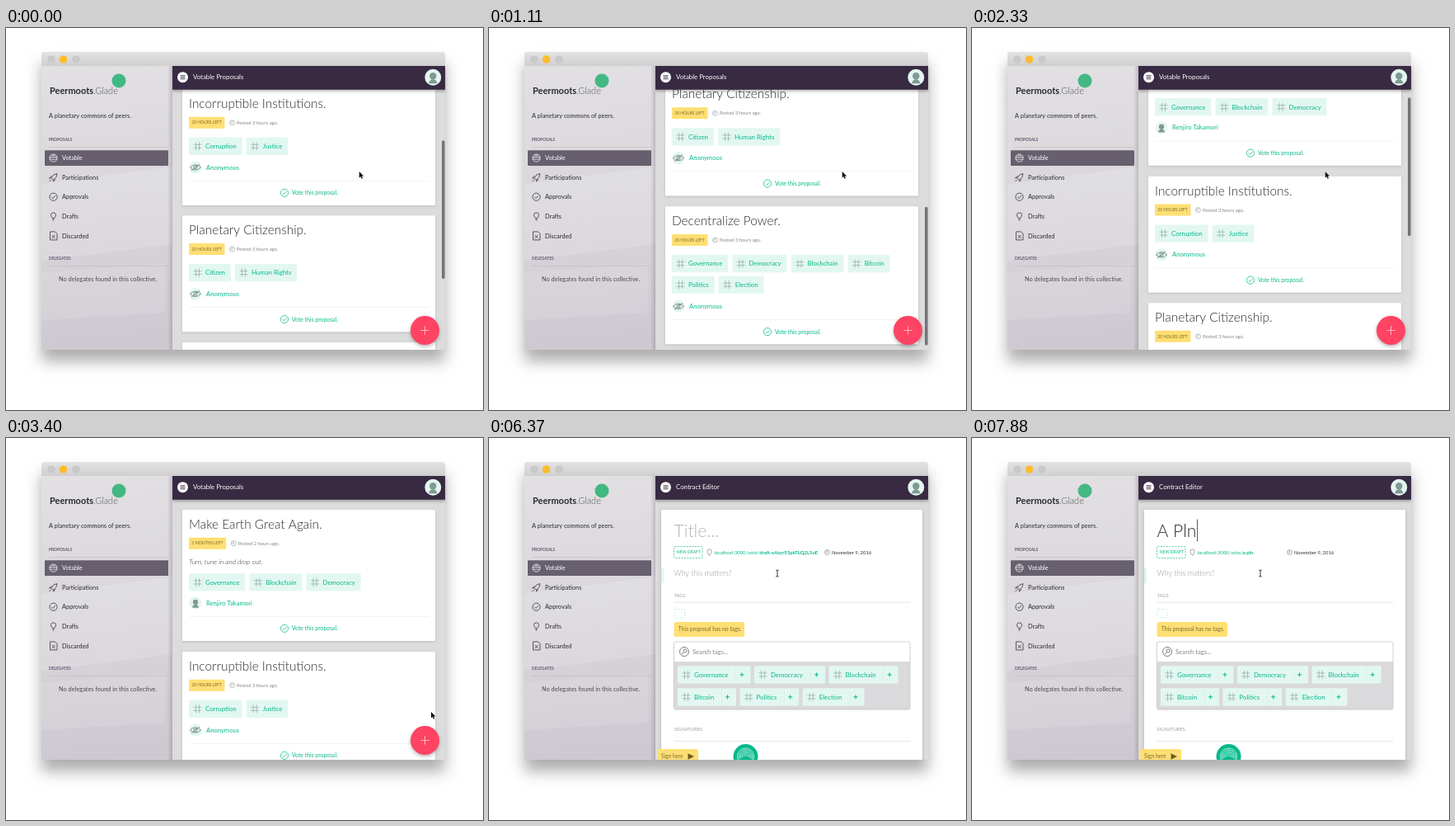
Recreate the animation shown at these times as an HTML page with a canvas. Size 579 px wide and 463 px high, loop 8000 ms.

```html
<!DOCTYPE html>
<html lang="en">
<head>
<meta charset="utf-8">
<title>Votable Proposals</title>
<style>
  html, body { margin: 0; width: 100%; height: 100%; overflow: hidden; background: #fff; }
  canvas { display: block; width: 579px; height: 463px; }
</style>
</head>
<body>
<canvas id="stage"></canvas>
<script>
const W = 579, H = 463, LOOP = 8000;
const canvas = document.getElementById('stage');
const c = canvas.getContext('2d');
const ratio = window.devicePixelRatio || 1;
canvas.width = W * ratio;
canvas.height = H * ratio;

const GREEN = '#02b989', MINT = '#e3f7f1', YELLOW = '#ffdf73', INK = '#2b2a30', PURPLE = '#372a42';

const clamp = v => Math.max(0, Math.min(1, v));
const span = (t, a, b) => clamp((t - a) / (b - a));
const smooth = p => p * p * (3 - 2 * p);
const mix = (a, b, p) => a + (b - a) * p;

// Text is placed by its left edge and the middle of its capitals.
function text(s, x, y, size, color = INK, style = '400') {
  c.font = `${style} ${size}px Lato, sans-serif`;
  c.fillStyle = color;
  c.fillText(s, x, y + size * 0.36);
  return c.measureText(s).width;
}

function box(x, y, w, h, fill, r = 0) {
  c.beginPath();
  c.roundRect(x, y, w, h, r);
  c.fillStyle = fill;
  c.fill();
}

function frame(x, y, w, h, color, r = 1, dash = []) {
  c.setLineDash(dash);
  c.lineWidth = 0.7;
  c.strokeStyle = color;
  c.beginPath();
  c.roundRect(x, y, w, h, r);
  c.stroke();
  c.setLineDash([]);
}

function disc(x, y, r, fill) {
  c.beginPath();
  c.arc(x, y, r, 0, 7);
  c.fillStyle = fill;
  c.fill();
}

function stroke(d, x, y, color, width = 0.75) {
  c.save();
  c.translate(x, y);
  c.strokeStyle = color;
  c.lineWidth = width;
  c.stroke(new Path2D(d));
  c.restore();
}

function shadowed(blur, dy, alpha, draw) {
  c.save();
  c.shadowColor = `rgba(0,0,0,${alpha})`;
  c.shadowBlur = blur * ratio;
  c.shadowOffsetY = dy * ratio;
  draw();
  c.restore();
}

function clipped(x, y, w, h, draw) {
  c.save();
  c.beginPath();
  c.rect(x, y, w, h);
  c.clip();
  draw();
  c.restore();
}

function ramp(x0, y0, x1, y1, ...colors) {
  const g = c.createLinearGradient(x0, y0, x1, y1);
  colors.forEach((color, i) => g.addColorStop(i / (colors.length - 1), color));
  return g;
}

const ring = r => `M${r} 0A${r} ${r} 0 1 1 ${-r} 0A${r} ${r} 0 1 1 ${r} 0`;
const ICON = {
  hash: 'M-2 -5V5M2 -5V5M-5 -2H5M-5 2H5',
  check: ring(4.6) + 'M-2.2 0L-0.5 1.8L2.4 -1.6',
  clock: ring(2.9) + 'M0 -1.8V0H-1.6',
  eye: 'M-6.5 0Q0 -6.5 6.5 0Q0 6.5 -6.5 0M-5 4L5 -4' + ring(2),
  ballot: ring(4.6) + 'M-4.6 -1H4.6M-4.6 1.5H4.6M-2 -3H2',
  rocket: 'M4.5 -4.5Q0 -4.5 -2.5 0.5L0 3Q4.5 0 4.5 -4.5M-2.5 0.5L-5 1L-2 -2M0 3L0 5L2.5 2M-2.5 2.5L-5 5',
  bulb: 'M-1.3 2Q-3 0 -3 -1.5A3 3 0 1 1 3 -1.5Q3 0 1.3 2ZM-1.2 3.5H1.2M-0.7 4.8H0.7',
  paper: 'M-4 -5H2L4.5 -2.5V5H-4ZM-1.8 -1L2 3M2 -1L-1.8 3',
  pin: 'M0 4Q-2.6 1 -2.6 -1A2.6 2.6 0 1 1 2.6 -1Q2.6 1 0 4',
  lens: ring(5.5) + 'M3 -1A2 2 0 1 1 -1 -1A2 2 0 1 1 3 -1M-0.5 0.5L-3 3'
};

function portrait(x, y, r) {
  disc(x, y, r, '#e5f5f0');
  disc(x, y - r * 0.15, r * 0.42, '#7f9993');
  c.beginPath();
  c.arc(x, y + r * 0.75, r * 0.5, Math.PI, 0);
  c.fill();
}

function tag(name, x, y, addable) {
  c.font = '400 7.85px Lato, sans-serif';
  const inner = c.measureText(name).width;
  const w = inner + (addable ? 47 : 27);
  box(x, y, w, 21.3, MINT, 1);
  stroke(ICON.hash, x + 10.5, y + 10.7, '#6f8c86', 0.5);
  text(name, x + 20, y + 10.7, 7.85, GREEN);
  if (addable) {
    box(x + inner + 29, y, 0.5, 21.3, '#d2ece4');
    stroke('M-2.5 0H2.5M0 -2.5V2.5', x + w - 10.5, y + 10.7, GREEN, 1);
  }
  return w;
}

function drawShell() {
  shadowed(18, 14, 0.32, () => box(43, 29, 490, 361, '#ddd', [4, 4, 0, 0]));
  box(43, 29, 490, 17, ramp(0, 29, 0, 46, '#e4e3e4', '#d0cfd0'), [4, 4, 0, 0]);
  disc(55, 38, 4.8, '#c9c8ca');
  disc(69.5, 38, 4.8, '#fdbb2f');
  disc(85, 38, 4.8, '#c9c8ca');
  box(202, 46, 331, 344, '#dddcdd');
}

function drawSidebar() {
  clipped(43, 46, 159, 344, () => {
    box(43, 46, 159, 344, ramp(43, 46, 75, 390, '#e2e0e3', '#d9d6db', '#cec9d1'));
    c.fillStyle = 'rgba(255,255,255,.14)';
    c.fill(new Path2D('M43 189L202 168V262L43 282Z'));
    c.fillStyle = 'rgba(255,255,255,.1)';
    c.fill(new Path2D('M43 296L193 286V345L43 354Z'));
    box(196, 46, 6, 344, ramp(196, 0, 202, 0, 'rgba(60,45,70,0)', 'rgba(60,45,70,.2)'));
  });

  disc(137, 64, 8.5, '#42b883');
  const w = text('Peermoots', 53, 76.5, 11, INK, 'bold');
  text('.Glade', 53 + w, 76.5, 11, '#55545a', '300');
  text('A planetary commons of peers.', 52, 106, 7.35);
  text('PROPOSALS', 52, 135, 4.9, '#65566f', 'bold');
  box(52, 144, 145, 0.7, '#c6c1c9');

  box(47, 148.3, 150, 18.7, '#675f6e', 1);
  const items = [['Votable', 'ballot'], ['Participations', 'rocket'], ['Approvals', 'check'],
                 ['Drafts', 'bulb'], ['Discarded', 'paper']];
  items.forEach(([label, icon], i) => {
    const y = 157.5 + i * 23.6, color = i ? INK : '#fff';
    stroke(ICON[icon], 57.5, y, color);
    text(label, 68, y, 7.4, color);
  });

  text('DELEGATES', 52, 279, 4.9, '#65566f', 'bold');
  box(52, 288, 145, 0.7, '#c3bec6');
  text('No delegates found in this collective.', 64, 304.5, 7.4, '#4c4a50');
}

function drawHeader(title) {
  shadowed(3, 2, 0.25, () => box(202, 46, 331, 28.7, PURPLE));
  disc(214.5, 59.7, 6.5, '#fff');
  stroke('M-3 -2H3M-3 0H3M-3 2H3', 214.5, 59.7, PURPLE, 0.9);
  text(title, 227, 59.3, 7.85, '#fff');
  portrait(518.3, 59.8, 10);
}

const PROPOSALS = [
  { top: 87, h: 159, title: 'Make Earth Great Again.', left: '2 MONTHS LEFT', posted: 'Posted 2 hours ago.',
    note: 'Turn, tune in and drop out.', rows: [['Governance', 'Blockchain', 'Democracy']], author: 'Renjiro Takamori' },
  { top: 259, h: 141, title: 'Incorruptible Institutions.', rows: [['Corruption', 'Justice']] },
  { top: 412.3, h: 141, title: 'Planetary Citizenship.', rows: [['Citizen', 'Human Rights']] },
  { top: 566, h: 167, title: 'Decentralize Power.',
    rows: [['Governance', 'Democracy', 'Blockchain', 'Bitcoin'], ['Politics', 'Election']] }
];

function drawProposal(p, y) {
  const bottom = y + p.h;
  shadowed(3, 1, 0.14, () => box(214, y, 307, p.h, '#fff', 1));
  text(p.title, 222, y + 17.1, 15.4, INK, '300');

  const left = p.left || '20 HOURS LEFT';
  c.font = '400 4.95px Lato, sans-serif';
  const w = c.measureText(left).width + 7;
  box(222, y + 33.7, w, 14, YELLOW, 1);
  text(left, 225.3, y + 40.7, 4.95, '#7d6727');
  stroke(ICON.clock, 222 + w + 9, y + 40.7, '#888', 0.6);
  text(p.posted || 'Posted 3 hours ago.', 222 + w + 14.5, y + 40.7, 5.8, '#85858a');
  if (p.note) text(p.note, 222, y + 63, 8.3, INK, 'italic 300');

  p.rows.forEach((row, i) => {
    let x = 222;
    for (const name of row) x += tag(name, x, y + (p.note ? 77.2 : 58.6) + i * 25.6) + 5;
  });

  if (p.author) portrait(230, bottom - 46, 7.5);
  else {
    disc(230, bottom - 46, 7.5, MINT);
    stroke(ICON.eye, 230, bottom - 46, '#40524f', 0.6);
  }
  text(p.author || 'Anonymous', 243, bottom - 46.2, 7.65, GREEN);
  box(222, bottom - 30, 291, 0.7, '#f0eef5');
  stroke(ICON.check, 338, bottom - 15.2, GREEN);
  text('Vote this proposal.', 347, bottom - 15.2, 6.85, GREEN);
}

// Scrolling advances in discrete ticks.
function scrollAt(t) {
  if (t < 1500) {
    const tick = t < 50 ? 0 : Math.floor((t - 50) / 118.2) + 1;
    return 350 - 165 * Math.pow(1 - Math.min(1, tick / 12), 4.5);
  }
  const tick = t < 1620 ? 0 : Math.floor((t - 1620) / 117.4) + 1;
  return 350 * (1 - Math.pow(Math.min(1, tick / 9), 1.02));
}

function drawFeed(t) {
  const scroll = scrollAt(t);
  clipped(202, 74, 331, 316, () => {
    for (const p of PROPOSALS) {
      const y = p.top - scroll;
      if (y < 392 && y + p.h > 70) drawProposal(p, y);
    }
    const press = Math.sin(Math.PI * span(t, 3700, 3970));
    shadowed(4, 2, 0.28, () => disc(508.5, 366.5, 17.5, press > 0.3 ? '#f23659' : '#ff4363'));
    stroke('M-5.3 0H5.3M0 -5.3V5.3', 508.5, 366.5, '#fff', 0.6);
  });
  drawHeader('Votable Proposals');
  c.globalAlpha = 1 - span(t, 3000, 3350);
  box(529, 45.5 + scroll * 0.49, 3.6, 168, '#77737a', 1.8);
  c.globalAlpha = 1;
}

const TYPING = [[6540, 'A'], [6720, 'A '], [7080, 'A P'], [7410, 'A Pl'], [7700, 'A Pln']];

function typedAt(t) {
  let value = '';
  for (const [at, s] of TYPING) if (t >= at) value = s;
  return value;
}

function caretOn(t) {
  return t >= 6540 || (t >= 4840 && t < 5330) || (t >= 5830 && t < 6370);
}

function drawThumbprint(x, y) {
  disc(x, y, 15, '#06b98b');
  c.strokeStyle = '#d9fff3';
  c.lineWidth = 0.8;
  for (let r = 2; r <= 10; r += 2) {
    c.beginPath();
    c.arc(x, y, r, Math.PI * (0.95 - r * 0.01), Math.PI * (2.05 + r * 0.01));
    c.stroke();
  }
}

function drawEditor(t) {
  const typed = typedAt(t);
  const extra = 12.6 * (1 - smooth(span(t, 5000, 5170)));
  const reveal = t < 4990 ? 0.3 * span(t, 4840, 4990) : mix(0.66, 1, span(t, 5000, 5170));
  const low = extra - 18 * (1 - reveal);

  clipped(202, 74, 331, 316, () => {
    c.globalAlpha = mix(0.25, 1, span(t, 4570, 4840));
    shadowed(4, 1, 0.2, () => box(209, 87, 317, 330, '#fff', 1));

    const w = text(typed || 'Title...', 224.5, 112.6, 21.1, typed ? INK : '#b4b3b7', '300');
    if (caretOn(t)) box(typed ? 224.5 + w + 0.6 : 224, 98.5, 0.8, 27, typed ? '#333' : '#888');

    frame(224.5, 131.5, 34.5, 14, GREEN, 1, [2, 1.5]);
    text('NEW DRAFT', 227.8, 138.7, 4.95, GREEN);
    stroke(ICON.pin, 267.5, 138.5, '#666', 0.6);
    const slug = typed ? typed.trim().toLowerCase().replace(' ', '-') : 'draft-eAzyr53pkTLQ2L5uE';
    const base = text('localhost:3000/vote/', 273.5, 138.7, 5.85, GREEN);
    text(slug, 273.5 + base, 138.7, 5.95, GREEN, 'bold');
    const dateX = 416 - 22 * smooth(span(t, 6540, 7320)) - 3 * span(t, 7410, 7880);
    stroke(ICON.clock, dateX - 5.5, 138.5, '#666', 0.6);
    text('November 9, 2016', dateX, 138.7, 5.85);

    if (t >= 5780) box(209, 157, 3, 19, '#e0f6ef');
    text('Why this matters?', 224.5, 164 + extra, 9, '#9a999d', '300');
    text('TAGS', 224.5, 191.3 + extra, 5.75, '#a09fa4');
    box(224.5, 198.7 + extra, 287, 0.7, '#dddce0');
    frame(225, 207.5 + extra, 12.5, 10.5, '#b6e8d9', 1, [2, 1.5]);

    const warnTop = 223 + extra;
    clipped(224, warnTop, 90, 18 * reveal, () => {
      c.globalAlpha *= reveal;
      box(224.5, warnTop, 85.5, 18, YELLOW, 2);
      text('This proposal has no tags.', 229.8, warnTop + 9, 6.8, '#7d6a30');
    });

    shadowed(2, 0.7, 0.2, () => box(224.5, 247 + low, 286.5, 81.5, '#dad9db', 2));
    box(224.5, 247 + low, 286.5, 24, '#fff', [2, 2, 0, 0]);
    frame(224.5, 247 + low, 286.5, 81.5, '#c9c8cc', 2);
    stroke(ICON.lens, 237, 259 + low, '#555');
    text('Search tags...', 247, 259 + low, 7.6, '#85848a');
    [['Governance', 'Democracy', 'Blockchain'], ['Bitcoin', 'Politics', 'Election']].forEach((row, i) => {
      let x = 229;
      for (const name of row) x += tag(name, x, 276.2 + low + i * 27, true) + 4.5;
    });

    text('SIGNATURES', 224.5, 353.3 + low, 5.75, '#a09fa4');
    box(224.5, 367 + low, 287, 0.7, '#dddce0');
    box(204, 377 + low, 50, 18, YELLOW, 2);
    text('Sign here', 209, 386 + low, 6.6, '#7d6a30');
    c.fillStyle = '#6f5c25';
    c.fill(new Path2D(`M241.5 ${382.3 + low}L249 ${386 + low}L241.5 ${389.7 + low}Z`));
    drawThumbprint(311.5, 386 + low);
    c.globalAlpha = 1;
  });
  drawHeader('Contract Editor');
}

const POINTER = [[0, 428.7, 174], [2880, 428.7, 174], [3400, 516, 332], [3640, 511, 351],
                 [3970, 510, 363.5], [5320, 510, 363.5], [5830, 350, 164]];

function drawPointer(t) {
  let i = 0;
  while (i < POINTER.length - 2 && t >= POINTER[i + 1][0]) i++;
  const [t0, x0, y0] = POINTER[i], [t1, x1, y1] = POINTER[i + 1];
  const p = smooth(span(t, t0, t1));
  const x = mix(x0, x1, p), y = mix(y0, y1, p);

  if (t > 5320 && y < 182) {
    stroke('M-1.8 -4Q0 -4 0 -3V3Q0 4 -1.8 4M1.8 -4Q0 -4 0 -3M0 3Q0 4 1.8 4', x, y, '#222', 0.9);
    return;
  }
  c.save();
  c.translate(x, y);
  const arrow = new Path2D('M0 0V7.6L1.8 6L3 8.8L4.3 8.2L3.1 5.5H5.5Z');
  c.strokeStyle = '#fff';
  c.lineWidth = 1;
  c.stroke(arrow);
  c.fillStyle = '#111';
  c.fill(arrow);
  c.restore();
}

function render(t) {
  c.setTransform(ratio, 0, 0, ratio, 0, 0);
  c.globalAlpha = 1;
  c.fillStyle = '#fff';
  c.fillRect(0, 0, W, H);
  drawShell();
  if (t < 4570) drawFeed(t);
  else drawEditor(t);
  drawSidebar();
  drawPointer(t);
}

const start = performance.now();
function loop() {
  render((performance.now() - start) % LOOP);
  requestAnimationFrame(loop);
}
loop();
</script>
</body>
</html>
```
